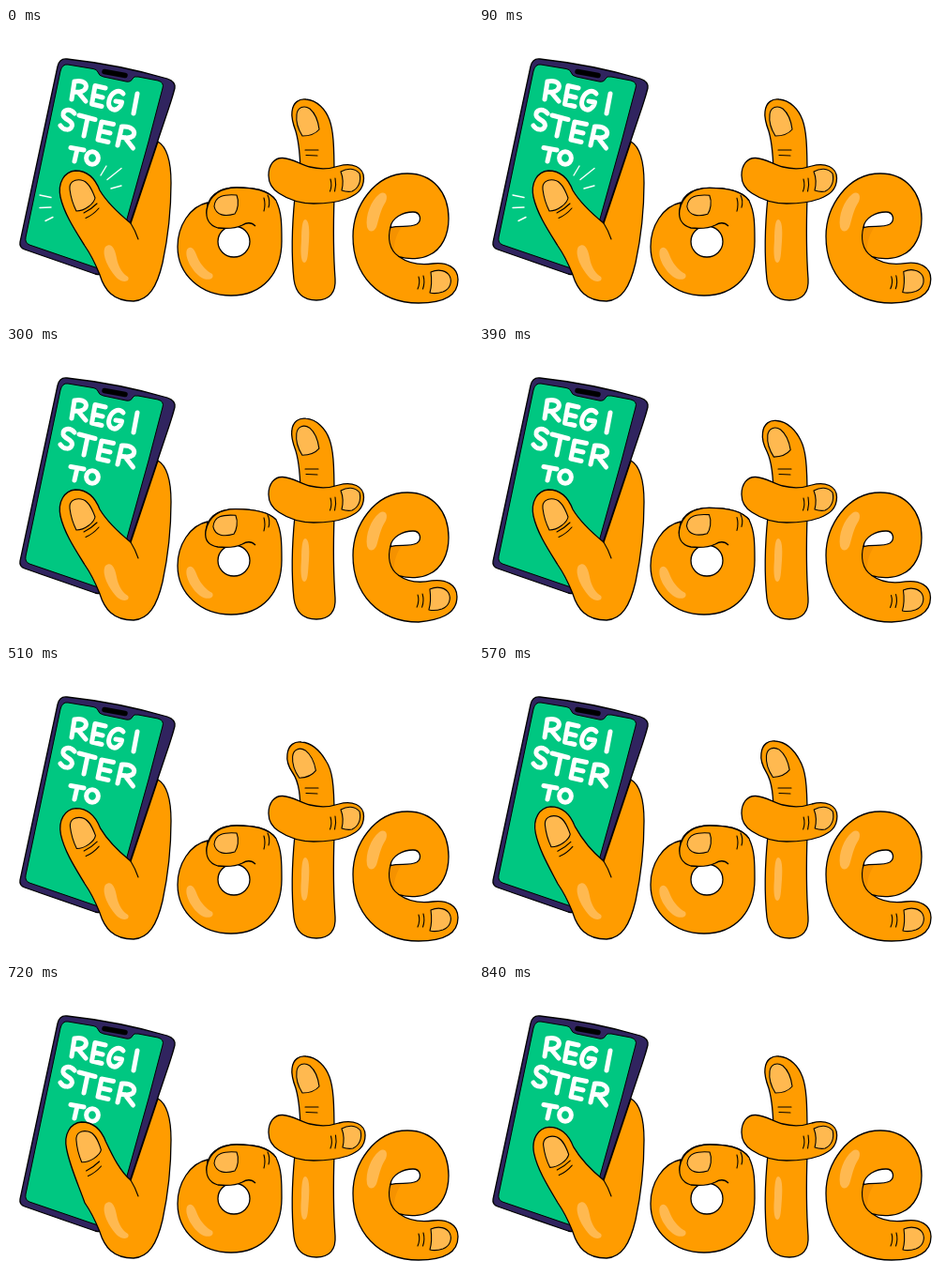
These frames come from a looping animation (498x310 px, 870 ms). An HTML page:

```html
<!DOCTYPE html>
<html lang="en">
<head>
<meta charset="utf-8">
<title>Register to vote</title>
<style>
html, body { margin: 0; width: 100%; height: 100%; overflow: hidden; background: #fff; }
svg { display: block; width: 100%; height: 100%; }
.skin { fill: #ff9c00; stroke: #000; stroke-width: 1.3; stroke-linejoin: round; }
.nail { fill: #ffb950; stroke: #000; stroke-width: 1.1; stroke-linejoin: round; }
.line { fill: none; stroke: #000; stroke-width: 1.1; stroke-linecap: round; }
.shine { fill: #ffb950; }
.hole { fill: #fff; stroke: #000; stroke-width: 1.3; }
.pen { fill: none; stroke: #fff; stroke-linecap: round; stroke-linejoin: round; }
</style>
</head>
<body>
<svg viewBox="0 0 498 310" role="img" aria-label="Register to vote">
  <g id="phone">
    <path fill="#30245f" stroke="#000" stroke-width="1.3" d="M65 33 Q120 39 172 54 Q181 57 180 64 Q178 72 174 84 L132 209 L106 259 Q103 264 95 262 L20 236 Q14 234 15 228 L55 41 Q57 32 65 33Z"/>
    <path fill="#00c781" stroke="#000" stroke-width="1" d="M66 39 L93 43.500 Q97 44 98 47 Q99 51 104 52 L128 57 Q133 58 135 54 Q136 51 141 52 L162 56 Q169 58 167 64 L152 121 L128 207 L104 258 L25 231 Q20 229 21 223 L58 46 Q60 38 66 39Z"/>
    <path fill="none" stroke="#000" stroke-width="5.500" stroke-linecap="round" d="M105 46.500 L127 50.500"/>
  </g>
  <g id="lettering" class="pen" stroke-width="5">
    <path d="M73 57 L70 76 M73 57 C84 55 88 61 84 65.500 C82 68 77 68.500 72 68 M77 68.500 L85 78"/>
    <path d="M106 64 L95 61.500 L91.500 81 L102 83.500 M93 71.500 L103 74"/>
    <path d="M125 70 C120 64 112 69 110 77 C108 85 114 89 119 86 C122 84 123 82 123.500 79 L117 78"/>
    <path d="M140 70 L136 91"/>
    <path d="M73 91 C68 85 60 87 61 93 C62 98 71 98 70.500 104 C69 110 61 109 58 104"/>
    <path d="M78 93 L95 97.500 M87 96 L83 115"/>
    <path d="M114.500 102.500 L102 100 L98 119 L109 121.500 M100 109.500 L111 112"/>
    <path d="M123.500 105 L119 125 M123.500 105 C135 104 139 111 135.500 115 C132 118 126 117 122 116 M127 117 L135.500 128"/>
    <path d="M69 127.500 L83 130 M76 129 L73 142"/>
    <ellipse cx="92" cy="138.500" rx="6.400" ry="6.800"/>
  </g>
  <path id="sparks" class="pen" stroke-width="1.400" d="M36 178 L48 180.500 M36 191.500 L48 191 M42 205.500 L50 201.500 M101 157 L107 147 M108 161.500 L123 149.500 M112 171 L123 168"/>

  <g id="v">
    <path id="hand" class="skin"/>
    <path class="line" d="M133 208 Q138 216 141 225"/>
    <path id="thumbNail" class="nail" d="M68 172 C67 164 73 161 80 162 C87 163 91 170 95 181 C94 187 84 195 75 195 C71 187 69 180 68 172Z"/>
    <path id="thumbFold" class="line" d="M83 197 Q91 193 97 187 M85 202.500 Q93 199 99 192"/>
    <path class="shine" d="M106 233 C112 228 116 234 118 245 C120 256 125 262 130 265 C133 270 125 272 119 267 C110 258 101 241 106 233Z"/>
  </g>

  <g id="o">
    <path id="oBody" class="skin"/>
    <ellipse class="hole" cx="243" cy="227.500" rx="17" ry="16.500"/>
    <path id="oTip" class="skin"/>
    <path id="oNail" class="nail" d="M222 190 C223 179 232 177 246 178 C249 185 247 194 244 198 C234 201 224 200 222 190Z"/>
    <path id="oFold" class="line" d="M275 181 Q277 188 275 195 M279 178 Q282 184 280 191"/>
    <path class="shine" d="M193 236 C197 231 201 235 204 244 C208 253 214 259 220 262 C223 268 214 270 207 265 C198 258 190 244 193 236Z"/>
  </g>

  <g id="t">
    <path class="skin" d="M308 180 C305 210 304 240 307 268 C309 283 317 290 331 290 C345 290 352 282 351 267 C349 240 349 210 350 180Z"/>
    <path id="tTip" class="skin"/>
    <path id="tNail" class="nail" d="M310 92 C311 84 318 82 324 86 C331 92 333 100 334 108 C329 114 322 115 316 115 C311 107 309 100 310 92Z"/>
    <path class="line" d="M319 130 L333 130 M320 135.500 L332 136"/>
    <path id="bar" class="skin"/>
    <path id="barNail" class="nail" d="M357 153 C364 149 372 149 377 155 C379 163 376 171 369 174 C364 175 361 174 358 173 C360 165 359 158 357 153Z"/>
    <path id="barFold" class="line" d="M346 161 Q348 168 345.500 174 M351 160 Q352.500 167 350.500 174"/>
    <path class="shine" d="M319 204 C323 204 324 215 323 227 C322 240 322 250 318 250 C314 249 314 237 315 226 C315 214 316 204 319 204Z"/>
  </g>

  <g id="e">
    <path id="eBody" class="skin"/>
    <path fill="#f59200" d="M410 212 L421 213 C415 222 413 232 414 242 C408 234 407 222 410 212Z"/>
    <path class="hole" d="M410 212.500 C411 202 424 196 434 196 C442 196 444 205 438 209 C430 213 420 210 410 212.500Z"/>
    <path class="line" d="M410 212 C407 223 408 236 419 243.500"/>
    <path id="eNail" class="nail" d="M453 260 C462 256 470 259 473 264 C476 270 474 278 466 281 C460 283 456 283 452 282 C454 275 454 267 453 260Z"/>
    <path id="eFold" class="line" d="M440 265 Q442 271 439 278 M445 264 Q447 271 444.500 278"/>
    <path class="shine" d="M385 212 C383 200 389 184 398 177 C404 173 408 178 405 185 C399 194 398 203 395 212 C392 218 387 218 385 212Z"/>
  </g>
</svg>
<script>
const LOOP = 870, STEP = 30;
const $ = id => document.getElementById(id);

const ease = u => {
  u = Math.min(1, Math.max(0, u));
  return u * u * (3 - 2 * u);
};
// Rises from a to b, falls back from b to c.
const bump = (t, a, b, c) => t < b ? ease((t - a) / (b - a)) : 1 - ease((t - b) / (c - b));
// Returns a point maker that follows an offset by a given weight.
const follow = (dx, dy) => (x, y, w = 1) => `${x + dx * w} ${y + dy * w} `;
const path = (id, d) => $(id).setAttribute('d', d);
const move = (id, x, y = 0, turn = 0, cx = 0, cy = 0) =>
  $(id).setAttribute('transform', `translate(${x} ${y}) rotate(${turn} ${cx} ${cy})`);

function thumb(k) {
  const p = follow(6.5 * k, -6 * k);
  path('hand', 'M133 208 C122 199 ' + p(109, 188, .8) + p(100, 173) +
    'C' + p(95, 160) + p(86, 152) + p(74, 152) +
    'C' + p(62, 153) + p(55, 165) + p(58, 180) +
    'C' + p(62, 198, .9) + p(74, 216, .5) + '84 232 ' +
    'C93 245 96 253 100 263 C105 279 114 291 136 291 ' +
    'C152 290 161 276 167 250 C173 222 176 195 176 165 C176 145 172 127 162 121Z');
  move('thumbNail', 6.5 * k, -6 * k, 3 * k, 81, 180);
  move('thumbFold', 2.5 * k, k);
}

function oFinger(k) {
  const p = follow(-1.2 * k, 2.8 * k);
  path('oBody', 'M215 186 C196 190 183 211 183 233 C183 263 208 285 240 285 ' +
    'C274 285 294 261 294 227 C294 209 294 196 288 184 ' +
    'C' + p(280, 172) + p(263, 170) + p(246, 170) +
    'C' + p(225, 170) + p(214, 180) + p(214, 197) + 'Z');
  path('oTip', 'M266 211 C262 207 257 207 252 210 C244 214 236 214 226 213 ' +
    'C' + p(216, 210, .5) + p(213, 202) + p(214, 194) +
    'C' + p(217, 177) + p(230, 170) + p(246, 170) +
    'C' + p(263, 170) + p(280, 172) + '288 184');
  move('oNail', -1.2 * k, 1.4 * k);
  move('oFold', 0, k);
}

function tFinger(k) {
  const p = follow(-5 * k, 5 * k);
  path('tTip', 'M314 160 C314 140 313 124 ' + p(309, 110, .7) +
    'C' + p(306, 102) + p(304, 96) + p(305, 89) +
    'C' + p(306, 79) + p(313, 75) + p(320, 76) +
    'C' + p(332, 77) + p(341, 87) + p(345, 98, .7) +
    'C' + p(349, 109, .3) + '350 124 350 160Z');
  move('tNail', -4 * k, 4 * k, -3 * k, 322, 100);
}

function crossbar(k) {
  const p = follow(1.6 * k, 0);
  path('bar', 'M295 138.500 C306 139 313 145 324 148 C336 151 346 150 355 147 ' +
    'C' + p(369, 143) + p(381.5, 148) + p(381.5, 160) +
    'C' + p(381.5, 173) + p(373, 178) + p(363, 182) +
    'C352 186 341 187 328 187 C314 187 300 182 291 176 ' +
    'C283 171 280 164 280 157 C280 146 286 138 295 138.500Z');
  move('barNail', k);
  move('barFold', k * .5);
}

function eFinger(k) {
  const p = follow(-1.2 * k, -2.3 * k);
  path('eBody', 'M419 243.500 C430 247 443 246 451 242 C465 236 472 220 472 203 ' +
    'C472 175 455 155 428 155 C393 155 370 190 370 222 ' +
    'C370 262 396 293 440 293 ' +
    'C' + p(461, 293) + p(482, 288) + p(482, 268) +
    'C' + p(482, 255) + p(470, 249) + p(455, 251) +
    'C' + p(440, 253, .6) + '428 250 419 243.500Z');
  move('eNail', -1.2 * k, -2.3 * k);
  move('eFold', -k, -k);
}

function draw(t) {
  thumb(bump(t, 470, 720, 870));
  oFinger(bump(t, 30, 260, 510));
  tFinger(bump(t, 270, 510, 720));
  crossbar(bump(t, 510, 700, 870));
  eFinger(bump(t, 30, 240, 520));
  $('sparks').style.display = t < 270 ? '' : 'none';
}

const start = performance.now();
function tick() {
  const t = (performance.now() - start) % LOOP;
  draw(Math.floor(t / STEP) * STEP);
  requestAnimationFrame(tick);
}
tick();
</script>
</body>
</html>
```
